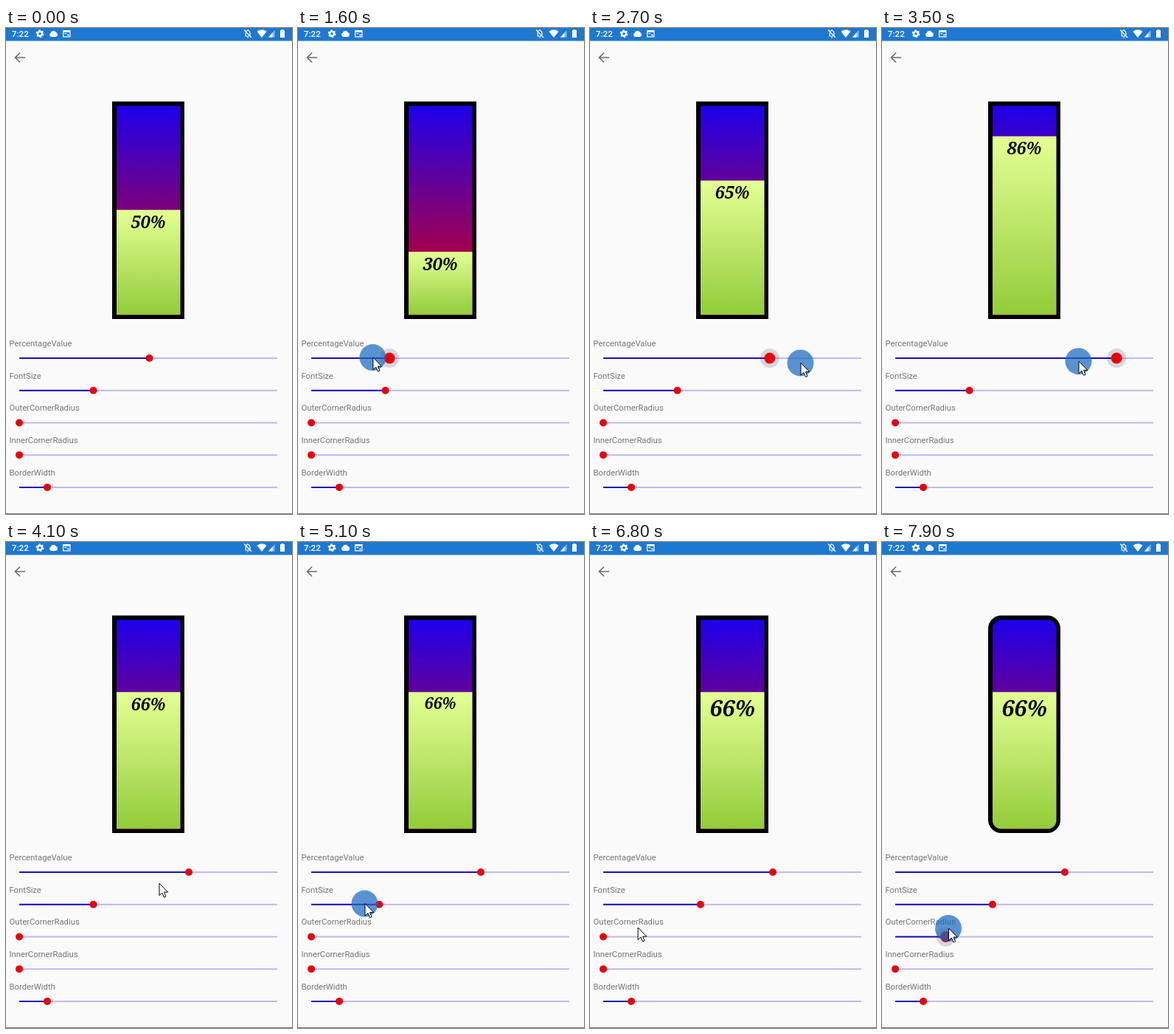
An HTML page for the animation above (8 s loop, 388 by 658 pixels).

```html
<!DOCTYPE html>
<html lang="en">
<head>
<meta charset="utf-8">
<title>Gauge settings</title>
<style>
  html, body { margin: 0; width: 100%; height: 100%; overflow: hidden; background: #fafafa; }
  svg { display: block; width: 388px; height: 658px; }
  text { font-family: Roboto, sans-serif; }
  .label { font-size: 11.28px; fill: #757575; }
  #percent { font-family: "Noto Serif", serif; font-style: italic; font-weight: 600; text-anchor: middle; }
</style>
</head>
<body>
<svg viewBox="0 0 388 658">
  <defs>
    <linearGradient id="cold" x2="0" y2="1">
      <stop stop-color="rgb(30,0,235)"/><stop offset="1" stop-color="rgb(220,0,10)"/>
    </linearGradient>
    <linearGradient id="lime" x2="0" y2="1">
      <stop stop-color="#e4ff94"/><stop offset="1" stop-color="#92cc3a"/>
    </linearGradient>
    <clipPath id="inside"><rect id="inner" x="150" y="105.5" width="86.500" height="283"/></clipPath>
  </defs>
  <rect width="388" height="658" fill="#fafafa"/>
  <rect width="388" height="17.500" fill="#1f78d0"/>
  <rect y="657" width="388" height="1" fill="#777"/>

  <!-- status bar -->
  <g fill="#fff">
    <text x="7.800" y="12" font-size="11.700" font-weight="500">7:22</text>
    <g fill="none" stroke="#fff">
      <circle cx="46" cy="7.700" r="3" stroke-width="2.400"/>
      <circle cx="46" cy="7.700" r="4.600" stroke-width="1.600" stroke-dasharray="2.400 2.417"/>
    </g>
    <path d="M61 12a3 3 0 0 1-.3-5.500 3.800 3.800 0 0 1 7-.7 3.200 3.200 0 0 1-.2 6.200z"/>
    <path fill-rule="evenodd" d="M77 3h10.500v9.500H77zM78.200 5.800v5.500h8.100V5.800zM79.200 7h3.200v1.200h-3.200zM83.500 8.500h2v2h-2z"/>
    <path fill="none" stroke="#fff" stroke-width="1.200" d="M324.500 11h7.500M325.200 11V7q0-3.500 2.800-3.500T331 7v4M328 2v1.500M327 13h2M323 2.500l10 10.500"/>
    <path d="M347 13 340.500 4.700Q347-.2 353.500 4.700z"/>
    <path d="M356 12.500 364.500 3v9.500z" opacity=".5"/>
    <path d="M356 12.500 361.500 6.400v6.100z"/>
    <path d="M372 3h1.500V2h3v1h1.500v10h-6z"/>
  </g>
  <path d="M26 40H13.500M19 33.500 12.500 40l6.500 6.500" fill="none" stroke="#6c6c6c" stroke-width="1.700"/>

  <!-- gauge -->
  <rect id="outer" x="144" y="99.500" width="98" height="294.500"/>
  <g clip-path="url(#inside)">
    <rect x="150" y="105" width="87" height="284" fill="url(#cold)"/>
    <rect id="fill" x="150" width="87" fill="url(#lime)"/>
  </g>
  <text id="percent" x="193"></text>

  <g id="sliders"></g>
  <g id="cursor">
    <circle id="touch" cx="-.5" r="18" fill="#1767c0" opacity=".7"/>
    <path d="M0 0V16.500L3.900 13 6.500 19 9 17.900 6.500 12H11.700z" fill="#fff" stroke="#000"/>
  </g>
</svg>
<script>
const LOOP = 8000, STEP = 100, LAG = 200, LEFT = 18, TRACK = 350, FLOOR = 388.5;
const byId = id => document.getElementById(id);
const set = (el, attrs) => { for (const k in attrs) el.setAttribute(k, attrs[k]); };
const mix = (a, b, k) => a + (b - a) * k;
const easeOut = k => Math.sin(Math.min(Math.max(k, 0), 1) * Math.PI / 2);

// The hand glides to each stop in turn and rests there until the next one
const entry = { time: 500, x: 215, y: 425 };
const moves = [
  { from: 500, to: 800, x: 194.5, y: 447 },
  { from: 1000, to: 1820, x: 93, y: 446 },
  { from: 1985, to: 3128, x: 325, y: 455 },
  { from: 3277, to: 3688, x: 248, y: 450 },
  { from: 4000, to: 4500, x: 118.5, y: 489 },
  { from: 4820, to: 5600, x: 67, y: 490 },
  { from: 5660, to: 5920, x: 150.5, y: 491 },
  { from: 6360, to: 6960, x: 57, y: 525 },
  { from: 7000, to: 7300, x: 18, y: 535 },
  { from: 7400, to: 7780, x: 90.5, y: 523 }
];

// A finger rests on a slider from press to release; its thumb grows at the time "grow"
const sliders = [
  { name: "PercentageValue", start: 194.5, press: 800, grow: 900, release: 3900 },
  { name: "FontSize", start: 118.5, press: 4700, grow: 5200, release: 6100 },
  { name: "OuterCornerRadius", start: LEFT, press: 7500, grow: 7500, release: LOOP },
  { name: "InnerCornerRadius", start: LEFT },
  { name: "BorderWidth", start: 56 }
];

sliders.forEach((s, i) => {
  const y = 447 + i * 43.72;
  const add = (tag, attrs) => {
    const el = document.createElementNS("http://www.w3.org/2000/svg", tag);
    set(el, attrs);
    return byId("sliders").appendChild(el);
  };
  const line = { x: LEFT, y: y - .9, height: 1.9 };
  add("text", { class: "label", x: 4.5, y: y - 16 }).textContent = s.name;
  add("rect", { ...line, width: TRACK, fill: "#bab5f4" });
  s.bar = add("rect", { ...line, fill: "#1608b4" });
  s.ring = add("circle", { cy: y, r: 13, fill: "#201030", opacity: .15 });
  s.thumb = add("circle", { cy: y, fill: "#e8000b" });
});

function handAt(t) {
  let { x, y } = entry;
  for (const m of moves) {
    const k = easeOut((t - m.from) / (m.to - m.from));
    x = mix(x, m.x, k);
    y = mix(y, m.y, k);
  }
  return { x, y };
}

// The thumb trails the hand by LAG; returns the slider's value from 0 to 1
function placeSlider(s, t) {
  const x = t >= s.press + LAG ? handAt(Math.min(t, s.release) - LAG).x : s.start;
  const grown = t >= s.grow && t < s.release;
  set(s.bar, { width: x - LEFT });
  set(s.ring, { cx: x, visibility: grown ? "visible" : "hidden" });
  set(s.thumb, { cx: x, r: grown ? 7.5 : 5 });
  return (x - LEFT) / TRACK;
}

function draw(t) {
  const [value, font, corner] = sliders.map(s => placeSlider(s, t));
  const height = value * 282, top = FLOOR - height, size = font * 81, radius = corner * 90;
  set(byId("fill"), { y: top, height });
  set(byId("percent"), { y: top + size * 1.06, "font-size": size });
  byId("percent").textContent = Math.round(value * 100) + "%";
  set(byId("outer"), { rx: radius });
  set(byId("inner"), { rx: Math.max(0, radius - 6) });

  const { x, y } = handAt(t);
  const touching = sliders.some(s => t >= s.press && t < s.release);
  set(byId("touch"), { visibility: touching ? "inherit" : "hidden" });
  set(byId("cursor"), {
    transform: `translate(${x} ${y})`,
    visibility: t < entry.time ? "hidden" : "visible"
  });
}

const begin = performance.now();
function tick() {
  const t = (performance.now() - begin) % LOOP;
  draw(Math.floor(t / STEP) * STEP);
  requestAnimationFrame(tick);
}
tick();
</script>
</body>
</html>
```
